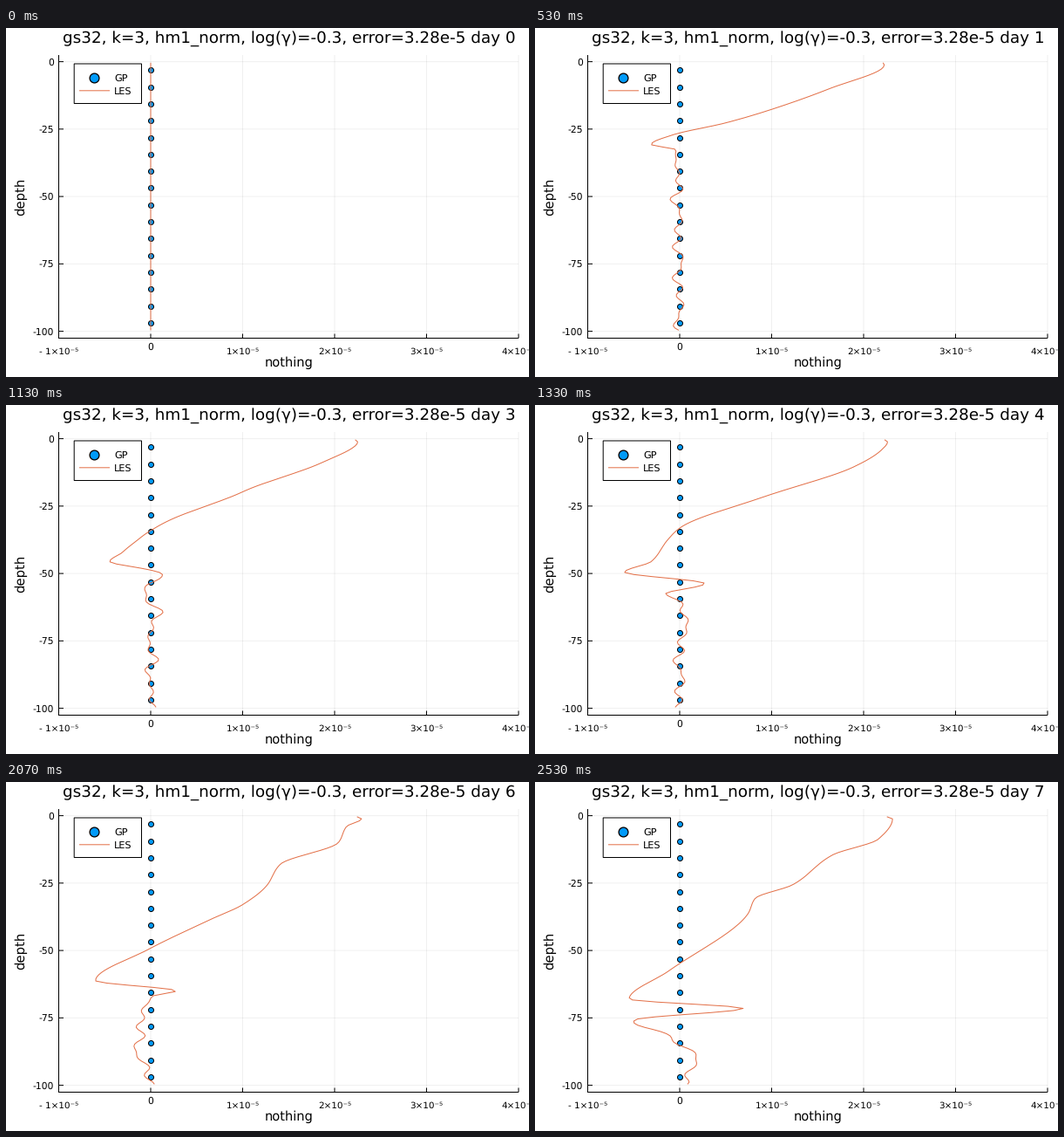
Write a matplotlib script that moves like this. It is 600 by 400 pixels and loops after 2.59 s.

```python
import numpy as np
import matplotlib.pyplot as plt
from matplotlib.animation import FuncAnimation

plt.rcParams["font.family"] = "DejaVu Sans"
plt.rcParams["text.hinting"] = "no_hinting"

PX = 0.72                    # points per pixel at 100 dpi
LOOP, TICK, FPS = 2590, 10, 15
LEFT, RIGHT, TOP, BOTTOM = 60.5, 588.0, 31.0, 355.5
ZERO_X, STEP_X = 166.0, 105.5    # stage x of 0 and width of 1e-5
ZERO_Y, STEP_Y = 38.6, 3.09      # stage y of the surface, pixels per metre
BLUE, ORANGE = "#009afa", "#e36f47"
DEPTHS = (np.arange(128) + 0.5) * 100 / 128

# Turning points of the flux (metres, 1e-5) at a few steps
TURNS = {
    8: [(10, 1.63), (17.8, 0.99), (22.7, 0.5), (27.2, -0.08), (30.7, -0.31),
        (32.7, -0.04)],
    14: [(7.8, 1.8), (16, 1.16), (20, 0.97), (33.3, -0.04), (39.2, -0.31),
         (41.4, -0.29), (43.7, -0.09), (47, 0)],
    20: [(4, 2.2), (10.5, 1.89), (21.4, 0.93), (32.7, 0.02), (37.5, -0.13),
         (45.6, -0.31), (49.5, -0.6), (53.7, 0.27), (57.6, -0.12), (67, 0.11),
         (75, 0)],
    26: [(10, 1.57), (18, 1.05), (25.6, 0.62), (35, 0.56), (42.7, 0.23),
         (51, -0.15), (62, -0.12), (67, 0.12), (73, -0.03), (76, 0.11),
         (81, -0.4), (85, 0.03)],
    31: [(4, 2.13), (10, 2.04), (18, 1.41), (26, 1.26), (33, 1.0),
         (38.5, 0.65), (49.5, -0.02), (61.2, -0.6), (65, 0.26), (67, 0.02),
         (84, -0.14)],
    38: [(8.7, 2.16), (14.6, 1.66), (25.6, 1.23), (30.7, 0.82), (36.5, 0.74),
         (57.6, -0.12), (68, -0.55), (71.5, 0.68), (75.7, -0.48), (80, -0.22),
         (92, 0.19)],
}
KEYS = sorted(TURNS)


def monotone(points, x):
    """Cubic through the points that never overshoots between them."""
    px, py = np.array(points, float).T
    h = np.diff(px)
    d = np.diff(py) / h
    a, b = d[:-1], d[1:]
    same = a * b > 0
    inner = np.where(same, 2 * a * b / np.where(same, a + b, 1), 0)
    m = np.concatenate([d[:1], inner, d[-1:]])
    i = np.clip(np.searchsorted(px, x, side="right") - 1, 0, len(h) - 1)
    t = (x - px[i]) / h[i]
    return (py[i] + t * h[i] * m[i]
            + t**2 * (3 * (py[i + 1] - py[i]) - h[i] * (2 * m[i] + m[i + 1]))
            + t**3 * (2 * (py[i] - py[i + 1]) + h[i] * (m[i] + m[i + 1])))


def base(step):
    """Depth of the mixed layer, growing as the square root of time."""
    return 11 * np.sqrt(step)


def profile(key, step):
    """Flux at a key, stretched to the mixed layer of this step."""
    z = np.interp(DEPTHS, [0, base(step), 100], [0, base(key), 100])
    surface = [(0.3, 2.2 + 0.0012 * key), (1.2, 2.2 + 0.003 * key)]
    return monotone(surface + TURNS[key] + [(100, 0)], z)


def waves(step):
    """Weak random waves in the still water below the mixed layer."""
    rng = np.random.default_rng(step)
    total = sum(np.sin(2 * np.pi * (DEPTHS / length + rng.random()))
                for length in (15, 9, 6))
    ramp = np.clip((DEPTHS - base(step) - 2) / 6, 0, 1)
    return 0.03 * min(step / KEYS[0], 1) * ramp * total


def flux(step):
    if step == 0:
        return np.zeros(DEPTHS.size)
    hi = next(k for k in KEYS if k >= step)
    lo = max((k for k in KEYS if k <= step), default=hi)
    w = (step - lo) / (hi - lo) if hi > lo else 0
    return (1 - w) * profile(lo, step) + w * profile(hi, step) + waves(step)


def stage_x(value):
    return ZERO_X + value * STEP_X


def stage_y(depth):
    return ZERO_Y + depth * STEP_Y


fig = plt.figure(figsize=(6, 4), dpi=100, facecolor="white")
ax = fig.add_axes([0, 0, 1, 1])
ax.set(xlim=(0, 600), ylim=(400, 0))
ax.axis("off")


def line(x, y, color="black", **kw):
    return ax.plot(x, y, color=color, lw=PX, snap=False,
                   solid_capstyle="butt", **kw)[0]


def text(x, y, s, size, ha="center", **kw):
    return ax.text(x, y, s, fontsize=size * PX, ha=ha, va="baseline", **kw)


def dots(x, y, size, edge=1.0, **kw):
    ax.plot(x, y, "o", ms=size * PX, mfc=BLUE, mec="black", mew=edge * PX,
            snap=False, **kw)


for n in range(-1, 5):
    x = stage_x(n)
    line([x, x], [TOP, BOTTOM], alpha=0.06)
    line([x, x], [BOTTOM, BOTTOM - 5])
    if n == 0:
        text(x, 369, "0", 10.8)
    else:
        text(x, 374, f"{'- ' if n < 0 else ''}{abs(n)}×10⁻⁵", 10.4)
for depth in range(0, 101, 25):
    y = stage_y(depth)
    line([LEFT, RIGHT], [y, y], alpha=0.06)
    line([LEFT, LEFT + 5.5], [y, y])
    text(55, y + 3.8, str(-depth), 10.7, ha="right")
line([LEFT, LEFT], [TOP, BOTTOM + 0.5])
line([LEFT, RIGHT], [BOTTOM, BOTTOM])
text(324.2, 388, "nothing", 14.6)
text(21, 193, "depth", 14.9, rotation=90, rotation_mode="anchor")

cells = (np.arange(16) + 0.5) * 6.25
dots(np.full(16, ZERO_X), stage_y(cells), 6)
curve = line(stage_x(flux(0)), stage_y(DEPTHS), ORANGE)

ax.add_patch(plt.Rectangle((78.2, 41), 77.3, 45.5, fc="white", ec="black",
                           lw=PX, snap=False, zorder=4))
dots(101.3, 56.7, 10.8, edge=1.3, zorder=5)
line([84, 119], [71.8, 71.8], ORANGE, zorder=5)
text(124, 60.5, "GP", 11.2, ha="left", zorder=5)
text(124, 75.5, "LES", 11.2, ha="left", zorder=5)
title = text(324.3, 17, "", 18.4)


def update(frame):
    step = (frame * TICK + 5) * FPS // 1000
    day = step * 5 // 24
    title.set_text(f"gs32, k=3, hm1_norm, log(γ)=-0.3, error=3.28e-5 day {day}")
    curve.set_xdata(stage_x(flux(step)))
    return curve, title


anim = FuncAnimation(fig, update, frames=LOOP // TICK, interval=TICK,
                     repeat=True, repeat_delay=0)
plt.show()
```
